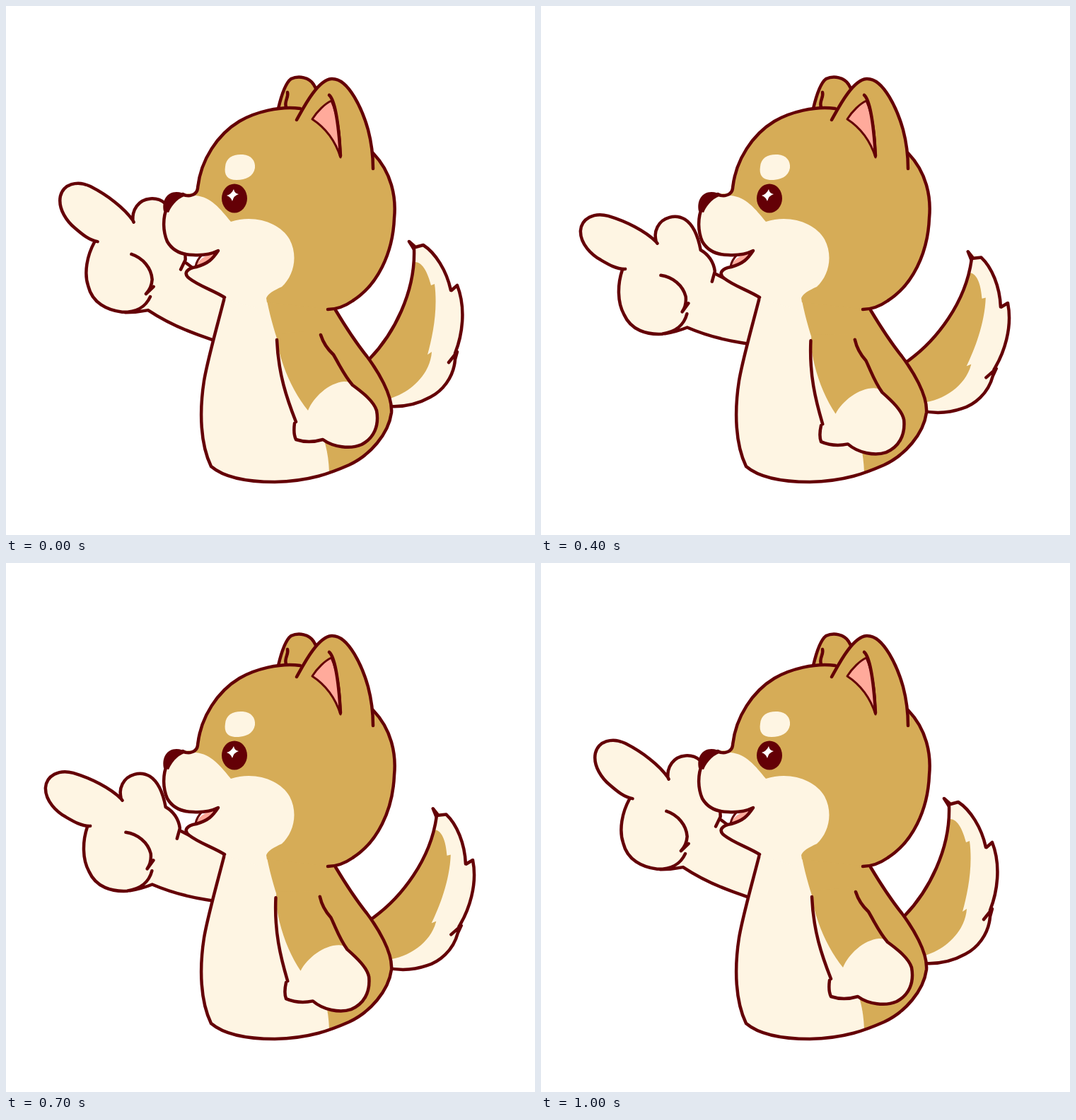
Animation, 748 px wide and 748 px high, one loop 1.2 s. Source, as an HTML page:

```html
<!DOCTYPE html>
<html lang="en">
<head>
<meta charset="utf-8">
<title>Pointing dog</title>
<style>
  @property --p { syntax: "<number>"; inherits: true; initial-value: 0; }
  html, body { margin: 0; width: 100%; height: 100%; overflow: hidden; background: #fff; }
  svg {
    display: block; width: 100%; height: 100%;
    fill: none; stroke-linecap: round; stroke-linejoin: round;
    animation: swing 1200ms step-end infinite;
  }
  /* --p: 0 = arm raised, 1 = arm lowered */
  @keyframes swing {
    0%      { --p: 0; }
    16.667% { --p: .14; }
    25%     { --p: .34; }
    33.333% { --p: .57; }
    41.667% { --p: 1; }
    58.333% { --p: .57; }
    66.667% { --p: .26; }
    75%     { --p: .07; }
    83.333%, 100% { --p: 0; }
  }
  .point { transform-origin: 339px 410px; transform: rotate(calc((1 - var(--p)) * 18.1deg)); }
  .tail  { transform-origin: 505px 534px; transform: rotate(calc(var(--p) * (1.45 - .45 * var(--p)) * 14.6deg)); }
  .near  { transform-origin: 368px 455px; transform: rotate(calc(var(--p) * (1.4 - .4 * var(--p)) * 7.5deg)); }
  .tan { fill: #d6ac57; }
  .cream { fill: #fef5e3; }
  .pink { fill: #ffaa9b; }
  .dark { fill: #640006; }
  .line { stroke: #640006; stroke-width: 4.5; }
  .thin { stroke-width: 3; }
</style>
</head>
<body>
<svg viewBox="0 0 748 748">
  <g class="tail">
    <path class="cream" d="M490 522L514 499C548 464 579 405 577 344L570 333L590 338C607 349 623 374 629 402L638 395C651 428 645 466 635 491L637 500C633 526 616 545 600 553C582 563 562 567 543 566L500 560Z"/>
    <path class="tan" d="M490 522L514 499C546 466 576 412 577 362C590 361 597 380 601 395L606 393C611 430 603 468 596 493L602 489C600 520 573 546 543 555L500 560Z"/>
    <path class="line" d="M495 517L514 499C548 464 579 405 577 344L570 333L579 341L590 338C607 349 623 374 629 402M630 402L638 395C651 428 645 466 635 491M626 504L638 489L635 500C633 526 616 545 600 553C582 563 562 567 543 566L520 562"/>
    <path class="dark" d="M569 331L579 340L577 350Z"/>
  </g>

  <g class="point">
    <path class="cream" d="M330 418L309 412Q275 403 245 392L241 385C238 374 230 366 218 361C212 343 203 327 190 321C176 315 158 322 153 337C150 346 152 352 154 358C137 345 108 335 82 331C61 328 45 340 46 357C48 376 67 389 80 394C92 399 104 404 113 403C108 425 111 450 123 466C136 487 159 490 180 486Q198 480 214 472Q250 482 292 483L330 484Z"/>
    <path class="line" d="M330 418L309 412Q275 403 245 392M240 403L242 388C238 374 230 366 218 361C212 343 203 327 190 321C176 315 158 322 153 337C150 346 152 352 154 358C137 345 108 335 82 331C61 328 45 340 46 357C48 376 67 389 80 394C92 399 104 404 116 402M112 404C108 425 111 450 123 466C136 487 159 490 180 486C199 480 209 470 211 453M167 404C184 404 200 414 206 429C208 437 207 445 204 451L211 438M184 485Q200 480 214 472Q250 482 292 483L330 484M154 358L156 360"/>
  </g>

  <path class="cream" d="M309 412C298 455 285 500 280 530C273 575 275 620 290 651C310 668 345 673 380 673C430 672 460 660 485 649C515 635 541 605 545 575C547 550 525 515 510 495C490 470 478 450 466 430L440 390H320Z"/>
  <path class="tan" d="M366 400C370 425 376 448 383 470L405 520L440 590C450 610 456 630 457 659Q472 655 485 649C515 635 541 605 545 575C547 550 525 515 510 495C490 470 478 450 466 430L440 390Z"/>
  <path class="line" d="M309 412C298 455 285 500 280 530C273 575 275 620 290 651C310 668 345 673 380 673C430 672 460 660 485 649C515 635 541 605 545 575C547 550 525 515 510 495C490 470 478 450 466 430"/>

  <g class="near">
    <path class="cream" d="M383 472C385 520 397 555 410 588Q404 605 410 613Q428 619 448 613C463 624 487 627 503 620C520 611 528 594 524 572C520 559 505 547 490 536C478 522 473 510 463 493Q450 481 445 465Z"/>
    <path class="tan" d="M384 463L383 472L386 488C394 519 409 550 427 572C435 553 456 533 478 531C489 531 497 537 502 545L490 536C478 522 473 510 463 493Q450 481 445 465V458Z"/>
    <path class="line" d="M383 472C385 520 397 555 410 588M408 590Q406 605 410 613Q428 619 448 613C463 624 487 627 503 620C520 611 528 594 524 572C520 559 505 547 490 536C478 522 473 510 463 493Q450 481 445 465"/>
  </g>

  <path class="tan line" d="M385 145C389 128 395 109 403 103C414 98 429 101 435 111L440 120L420 150Z"/>
  <path class="line" d="M398 122C400 130 393 134 396 143"/>

  <path class="tan" d="M309 412L320 380L310 340L243 300V266L268 265C272 222 298 182 330 163C352 150 387 141 416 145C428 128 442 105 460 103C485 101 505 150 512 175C516 188 518 200 520 208C545 235 552 270 549 300C547 350 525 395 490 417C480 424 468 429 455 429Z"/>
  <path class="cream" d="M228 284L243 270L268 268C290 270 303 287 318 305C352 294 388 307 401 330C414 355 406 382 390 397C379 402 371 406 368 413L371 432L309 414L258 386Q250 376 268 370Q288 362 300 346C284 352 262 353 249 350C235 346 226 337 224 318C221 304 223 292 228 284Z"/>
  <path class="pink" d="M268 369Q272 355 299 347Q287 364 268 369Z"/>
  <path class="line thin" d="M268 368Q270 359 277 352"/>
  <path class="line" d="M250 266C258 271 270 267 271 258C275 217 300 181 330 163C352 150 387 141 416 145M519 208C545 235 552 270 549 300C547 350 525 395 490 417C480 424 468 429 455 429M228 284C221 300 222 319 228 333C235 345 246 352 265 352C281 353 292 350 300 346C292 358 286 364 269 369C256 371 250 378 259 385C273 396 291 401 309 412"/>
  <path class="line" d="M411 161C420 145 440 105 460 103C485 101 505 150 512 175C517 194 519 212 519 230"/>

  <path class="pink line thin" d="M433 160C440 149 451 138 460 134C468 152 473 180 473 214C466 192 453 173 433 160Z"/>
  <path class="line" d="M457 126C464 132 470 160 473 212"/>
  <path class="dark" d="M223 290C220 276 227 263 241 263Q249 263 256 268C245 270 235 280 230 292Z"/>
  <path class="cream" d="M310 227C311 214 322 209 335 210C347 211 353 219 352 229C350 241 339 246 326 246C313 246 308 239 310 227Z"/>
  <ellipse class="dark" cx="323" cy="272" rx="18" ry="20.5"/>
  <path fill="#fff" d="M322 259Q323 265 329 266Q322 268 320 276Q318 270 312 268Q319 266 322 259Z"/>
</svg>
</body>
</html>
```
